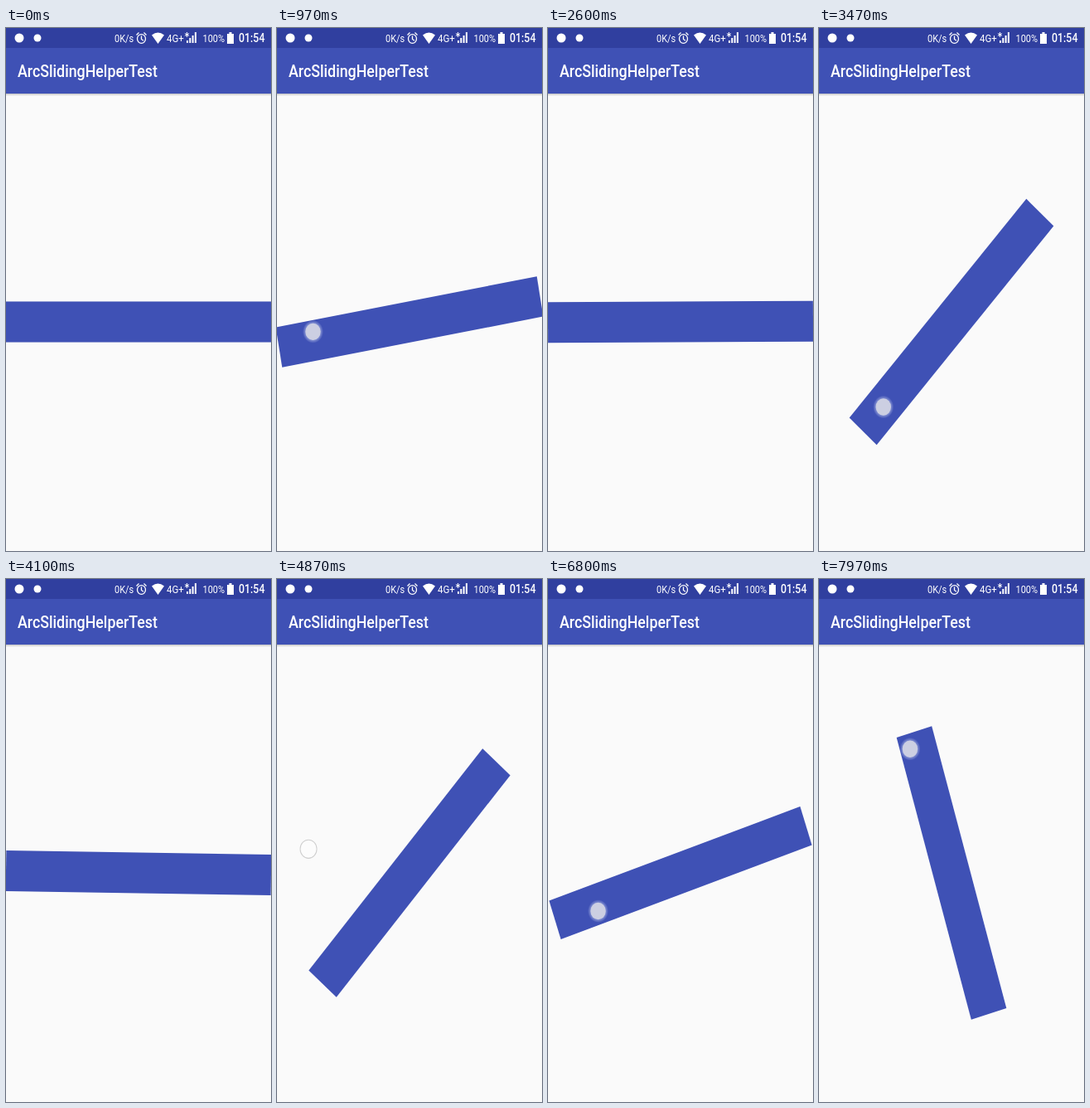
An HTML page for the animation above (8 s loop, 320x630 px).

```html
<!DOCTYPE html>
<html lang="en">
<head>
<meta charset="utf-8">
<title>Arc sliding</title>
<style>
  html, body { margin: 0; width: 100%; height: 100%; overflow: hidden; background: #fafafa; }
  svg { display: block; width: 100%; height: 100%; }
  text { font-family: Roboto, sans-serif; fill: #fff; }
</style>
</head>
<body>
<svg viewBox="0 0 320 630" preserveAspectRatio="none">
  <defs>
    <linearGradient id="shade" x2="0" y2="1">
      <stop offset="0" stop-color="#777" stop-opacity=".55"/>
      <stop offset="1" stop-color="#777" stop-opacity="0"/>
    </linearGradient>
    <radialGradient id="glow">
      <stop offset=".68" stop-color="#c5cdee" stop-opacity=".6"/>
      <stop offset="1" stop-color="#c5cdee" stop-opacity="0"/>
    </radialGradient>
  </defs>
  <rect width="320" height="630" fill="#fafafa"/>
  <rect y="78" width="320" height="4" fill="url(#shade)"/>
  <rect width="320" height="79" fill="#3f51b5"/>
  <rect width="320" height="24" fill="#303f9f"/>

  <g fill="#fff">
    <circle cx="16" cy="12" r="5.5"/>
    <circle cx="38" cy="12" r="4.5"/>
    <path d="M176 8.5Q183.500 2.500 191 8.500L183.500 19Z"/>
    <path d="M218 18v-3h2v3zM221.300 18v-6h2v6zM224.600 18v-9h2v9zM227.900 18v-13h2v13z"/>
    <path d="M267 7h2.500v-2h3v2h2.500v12h-8z"/>
  </g>
  <g fill="none" stroke="#fff" stroke-width="1.3">
    <ellipse cx="163.500" cy="13" rx="5" ry="5.400"/>
    <path d="M163.500 9.500v4l2.500 1.700M157.500 8.500l3-3M169.500 8.500l-3-3"/>
    <path stroke-width="1" d="M218.500 5v6M216 6.500l5 3M221 6.500l-5 3"/>
  </g>
  <g transform="scale(1 1.107)">
    <text x="131" y="15.200" font-size="11">0K/s</text>
    <text x="194" y="15.400" font-size="11.500">4G+</text>
    <text x="237.500" y="15.200" font-size="11">100%</text>
    <text x="281" y="15.500" font-size="12.400" font-weight="500">01:54</text>
    <text x="14" y="53.300" font-size="17.800" font-weight="500">ArcSlidingHelperTest</text>
  </g>

  <g transform="translate(160 354) scale(1 1.107)">
    <rect id="bar" x="-160" y="-22.150" width="320" height="44.300" fill="#3f51b5"/>
    <g id="touch">
      <circle id="halo" r="12.500" fill="url(#glow)"/>
      <circle id="dot"/>
    </g>
  </g>
</svg>
<script>
const $ = id => document.getElementById(id);
const LOOP = 8000;
const RING = 100; // a fresh touch is an empty ring for this long

// Each gesture: touch down, drag from grab to up, then a fling until stop.
// Turns are in degrees; hold is the finger's angle when it grabs the bar.
const gestures = [
  { down: 470, grab: 500, up: 2250, stop: 2960,
    slow: -71.2, ease: 1.5, flick: -13.8, fling: -128, hold: 184.7, r: 117, grow: 40 },
  { down: 2970, grab: 3070, up: 3760, stop: 4600,
    slow: -34, ease: 1.5, flick: -20.8, fling: -141.2, hold: 146.7, r: 121.7, grow: 56 },
  { down: 4800, grab: 4890, up: 5250, stop: 6000,
    slow: -100, ease: 1, flick: 0, fling: -124, hold: 192, r: 124.7, grow: 0 },
  { down: 6330, grab: 6339, up: LOOP, stop: LOOP + 800,
    slow: -380, ease: 1, flick: 0, fling: 0, hold: 263, r: 107.8, grow: 40 }
];

const part = (t, from, to) => Math.min(1, Math.max(0, (t - from) / (to - from)));

function turn(g, t) {
  const u = part(t, g.grab, g.up);
  const rest = 1 - part(t, g.up, g.stop);
  return g.slow * u ** g.ease + g.flick * u ** 12 + g.fling * (1 - rest * rest);
}

function drawTouch(g, t) {
  $("touch").style.display = g ? "" : "none";
  if (!g) return;

  const r = g.r + g.grow * part(t, g.grab, g.up) ** 6;
  const a = (g.hold + turn(g, t)) * Math.PI / 180;
  $("touch").setAttribute("transform", `translate(${r * Math.cos(a)} ${r * Math.sin(a)})`);

  const ring = t - g.down < RING;
  const dot = $("dot");
  $("halo").style.display = ring ? "none" : "";
  dot.setAttribute("r", ring ? 10 : 9.2);
  dot.setAttribute("fill", ring ? "#fcfcfc" : "#cccfe2");
  dot.setAttribute("stroke", ring ? "#cfcfcf" : "none");
}

function draw(t) {
  const angle = gestures.reduce((sum, g) => sum + turn(g, t), 0);
  $("bar").setAttribute("transform", `rotate(${angle})`);
  drawTouch(gestures.find(g => t >= g.down && t < g.up), t);
}

const start = performance.now();
function tick() {
  draw((performance.now() - start) % LOOP);
  requestAnimationFrame(tick);
}
tick();
</script>
</body>
</html>
```
